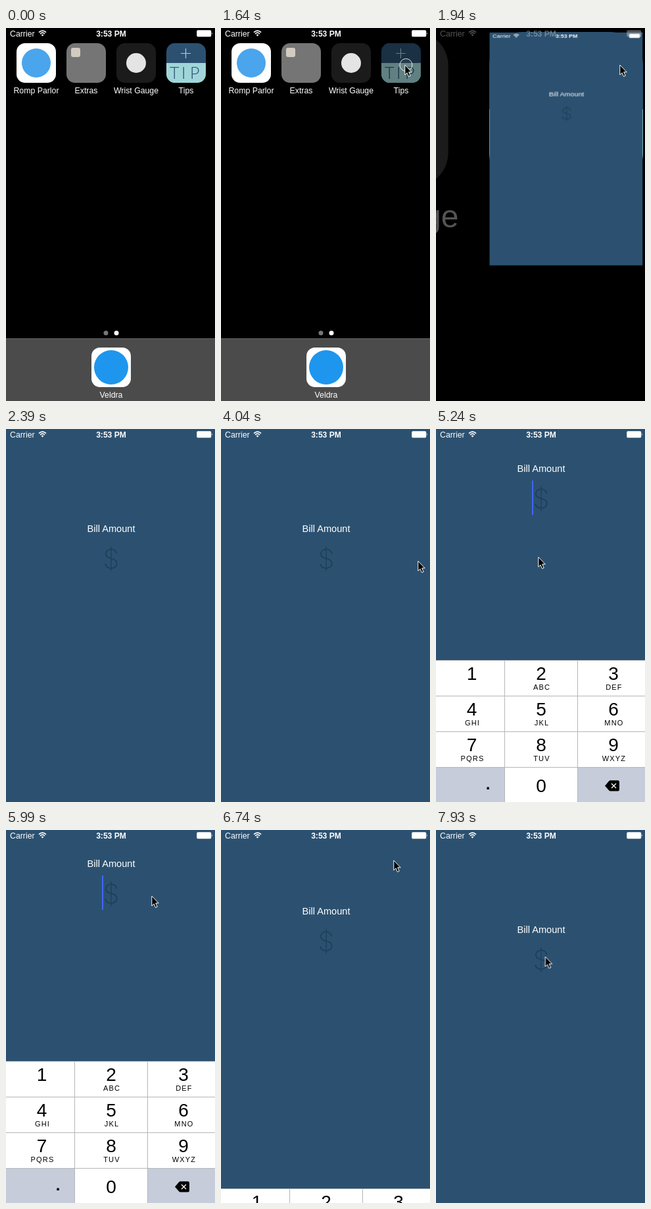
These frames come from a looping animation (318 px wide and 565 px high, 8000 ms). An HTML page:

```html
<!DOCTYPE html>
<html lang="en">
<head>
<meta charset="utf-8">
<title>Tip calculator</title>
<style>
html, body { margin: 0; width: 100%; height: 100%; overflow: hidden; background: #000; }
svg { display: block; width: 100%; height: 100%; }
text { font: 12.3px "Liberation Sans", Arial, sans-serif; fill: #fff; }
.mid { text-anchor: middle; }
.clock { font-size: 12.1px; font-weight: bold; }
.tip { font: 300 25px Lato, sans-serif; fill: #2c5170; }
.title { font-size: 14.6px; }
.dollar { font: 200 40px Inter, Lato, sans-serif; fill: #1e3f5a; }
.digit { font-size: 28px; fill: #000; }
.letters { font-size: 11px; letter-spacing: 1.2px; fill: #000; }

/* The screen is refreshed in steps, so every track holds between its keys. */
#home, #icons text, #bar, #app, #pressed, #touch, #cursor, #field, #caret, #pad {
  animation: 8s step-end infinite;
}
#home { animation-name: zoom; }
#icons text, #bar { animation-name: fade; }
#app { animation-name: launch; }
#pressed { animation-name: press; }
#touch { animation-name: touch; }
#cursor { animation-name: move; }
#field { animation-name: lift; }
#caret { animation-name: caret; }
#pad { animation-name: slide; }

@keyframes zoom {
  0% { transform: none; }
  22.375% { transform: translate(-194px, -18.3px) scale(1.645); }
  24.25% { transform: translate(-870.6px, -83.7px) scale(3.9); }
  26.125% { transform: translate(-1189.8px, -112.2px) scale(4.956); }
  28%, 100% { transform: translate(-1280px, -121px) scale(5.257); }
}
@keyframes fade {
  0% { opacity: 1; }
  22.375% { opacity: .85; }
  24.25% { opacity: .33; }
  26.125% { opacity: .08; }
  28%, 100% { opacity: 0; }
}
@keyframes launch {
  0% { opacity: 0; transform: none; }
  22.375% { opacity: .45; transform: translate(207.4px, 19.5px) scale(.31, .172); }
  24.25% { opacity: 1; transform: translate(81.5px, 6.8px) scale(.732, .624); }
  26.125% { opacity: 1; transform: translate(19.5px, 1.8px) scale(.935, .903); }
  28% { opacity: 1; transform: translate(2.4px, .2px) scale(.992, .986); }
  29.875%, 100% { opacity: 1; transform: none; }
}
@keyframes press {
  0%, 22.375%, 100% { opacity: 0; }
  20.5% { opacity: .4; }
}
@keyframes touch {
  0%, 22.375%, 59.875%, 82.375%, 100% { opacity: 0; }
  20.5%, 58%, 80.5% { opacity: 1; }
}
@keyframes move {
  0% { transform: translate(400px, 60px); }
  13.125% { transform: translate(298px, 60px); }
  15% { transform: translate(284px, 57px); }
  16.75% { transform: translate(279px, 56px); }
  26.125% { transform: translate(281px, 57px); }
  28% { transform: translate(302px, 75px); }
  29.875% { transform: translate(400px, 200px); }
  50.5% { transform: translate(299px, 200px); }
  52.375% { transform: translate(228px, 198px); }
  54.25% { transform: translate(168px, 195px); }
  56.125% { transform: translate(155px, 194px); }
  74.875% { transform: translate(221px, 100px); }
  76.75% { transform: translate(254px, 56px); }
  78.625% { transform: translate(262px, 46px); }
  89.75% { transform: translate(258px, 52px); }
  91.625% { transform: translate(237px, 86px); }
  93.5% { transform: translate(202px, 142px); }
  95.375% { transform: translate(178px, 176px); }
  97.25% { transform: translate(168px, 190px); }
  99.125%, 100% { transform: translate(165.5px, 192px); }
}
@keyframes lift {
  0%, 87.875%, 100% { transform: none; }
  61.75% { transform: translateY(-19px); }
  63.625% { transform: translateY(-62px); }
  65.5% { transform: translateY(-91px); }
  67.375% { transform: translateY(-99px); }
  69.25% { transform: translateY(-100px); }
  82.375% { transform: translateY(-80px); }
  84.25% { transform: translateY(-28px); }
  86.125% { transform: translateY(-4px); }
}
@keyframes caret {
  0%, 82.375%, 100% { opacity: 0; }
  59.875% { opacity: 1; }
}
@keyframes slide {
  0%, 86.125%, 100% { transform: translateY(566px); }
  61.75% { transform: translateY(458px); }
  63.625% { transform: translateY(364px); }
  65.5% { transform: translateY(350px); }
  82.375% { transform: translateY(445px); }
  84.25% { transform: translateY(543px); }
}
</style>
</head>
<body>
<svg viewBox="0 0 318 565" preserveAspectRatio="none">
  <defs>
    <g id="status">
      <text x="6" y="12.6">Carrier</text>
      <g fill="none" stroke="#fff" stroke-width="1.6">
        <path d="M50 6.6Q55.5 1.6 61 6.6M52 8.8Q55.5 5.6 59 8.8"/>
        <path d="M55.5 12.6L53.6 10.4Q55.5 8.8 57.4 10.4Z" fill="#fff" stroke="none"/>
      </g>
      <text x="160" y="12.6" class="mid clock">3:53 PM</text>
      <rect x="290.5" y="3.5" width="21.5" height="9.500" rx="1.5" fill="#fff" stroke="#fff" stroke-opacity=".5"/>
      <path d="M313.2 6.5q1.6 1.7 0 3.5z" fill="#fff"/>
    </g>
    <clipPath id="tile"><rect x="244" y="23" width="60" height="60" rx="13"/></clipPath>
    <clipPath id="screen"><rect width="318" height="565"/></clipPath>
  </defs>

  <rect width="318" height="565"/>

  <g id="home">
    <rect y="470" width="318" height="95" fill="#4b4b4b"/>
    <rect y="470" width="318" height="1" fill="#626262"/>
    <circle cx="152" cy="462" r="3.5" fill="#777"/>
    <circle cx="168" cy="462" r="3.5" fill="#fff"/>
    <g id="icons"></g>
    <rect x="99" y="30" width="14" height="14" rx="3" fill="#d3cbc0"/>
    <g clip-path="url(#tile)">
      <rect x="244" y="23" width="60" height="30" fill="#2c5170"/>
      <rect x="244" y="53" width="60" height="30" fill="#a0d6d9"/>
      <path d="M266 38.5h15M273.5 31v15" stroke="#a0d6d9" stroke-width="1.2"/>
      <text x="249 267 280" y="77" class="tip">TIP</text>
      <rect id="pressed" x="244" y="23" width="60" height="60"/>
    </g>
  </g>

  <g id="app">
    <g clip-path="url(#screen)">
      <rect width="318" height="565" fill="#2c5170"/>
      <use href="#status"/>
      <g id="field">
        <text x="160" y="155.5" class="mid title">Bill Amount</text>
        <text x="160" y="211" class="mid dollar">$</text>
        <rect id="caret" x="146" y="169" width="2" height="52" fill="#4366ff"/>
      </g>
      <g id="pad">
        <rect width="318" height="216" fill="#fff"/>
        <path d="M0 162h104v54H0zM216 162h102v54H216z" fill="#c6ccda"/>
        <path d="M0 .5H318M0 54.5H318M0 108.5H318M0 162.5H318M104.5 0V216M215.5 0V216" stroke="#b4b6ba"/>
        <g id="keys"></g>
        <text x="79" y="196" class="mid digit" style="font-size:24px;font-weight:bold">.</text>
        <path d="M257 190.5l6-7q1-1.2 2.5-1.2H276.5q2.5 0 2.5 2.5V196q0 2.5-2.5 2.5H265.5q-1.5 0-2.5-1.2z"/>
        <path d="M267 187l7 7M274 187l-7 7" stroke="#fff" stroke-width="1.3"/>
      </g>
    </g>
  </g>

  <use id="bar" href="#status"/>

  <g id="cursor">
    <circle id="touch" cx="2.5" r="9.5" fill="#fff" fill-opacity=".05" stroke="#fff" stroke-opacity=".85"/>
    <path d="M.8 0V15L4 11.8L6.5 17.5L9.2 16.3L6.7 10.8H11.2Z" stroke="#fff"/>
  </g>
</svg>
<script>
const byId = id => document.getElementById(id);
const label = (x, y, text, kind = "") => `<text x="${x}" y="${y}" class="mid ${kind}">${text}</text>`;

function icon([x, y, name, tile, dot, radius]) {
  const square = tile ? `<rect x="${x}" y="${y}" width="60" height="60" rx="13" fill="${tile}"/>` : "";
  const mark = dot ? `<circle cx="${x + 30}" cy="${y + 30}" r="${radius}" fill="${dot}"/>` : "";
  return square + mark + label(x + 30, y + 76, name);
}
byId("icons").innerHTML = [
  [16, 23, "Romp Parlor", "#fff", "#4aa5ec", 22],
  [92, 23, "Extras", "#757575"],
  [168, 23, "Wrist Gauge", "#1b1b1b", "#e4e4e4", 15],
  [244, 23, "Tips"],
  [130, 484, "Veldra", "#fff", "#1e96ee", 26],
].map(icon).join("");

const columns = [54.5, 160, 270];
const letters = ["", "ABC", "DEF", "GHI", "JKL", "MNO", "PQRS", "TUV", "WXYZ"];
byId("keys").innerHTML = letters.map((group, i) => {
  const x = columns[i % 3], y = Math.floor(i / 3) * 54;
  return label(x, y + 30, i + 1, "digit") + label(x + 1, y + 45, group, "letters");
}).join("") + label(160, 199.5, 0, "digit");
</script>
</body>
</html>
```
